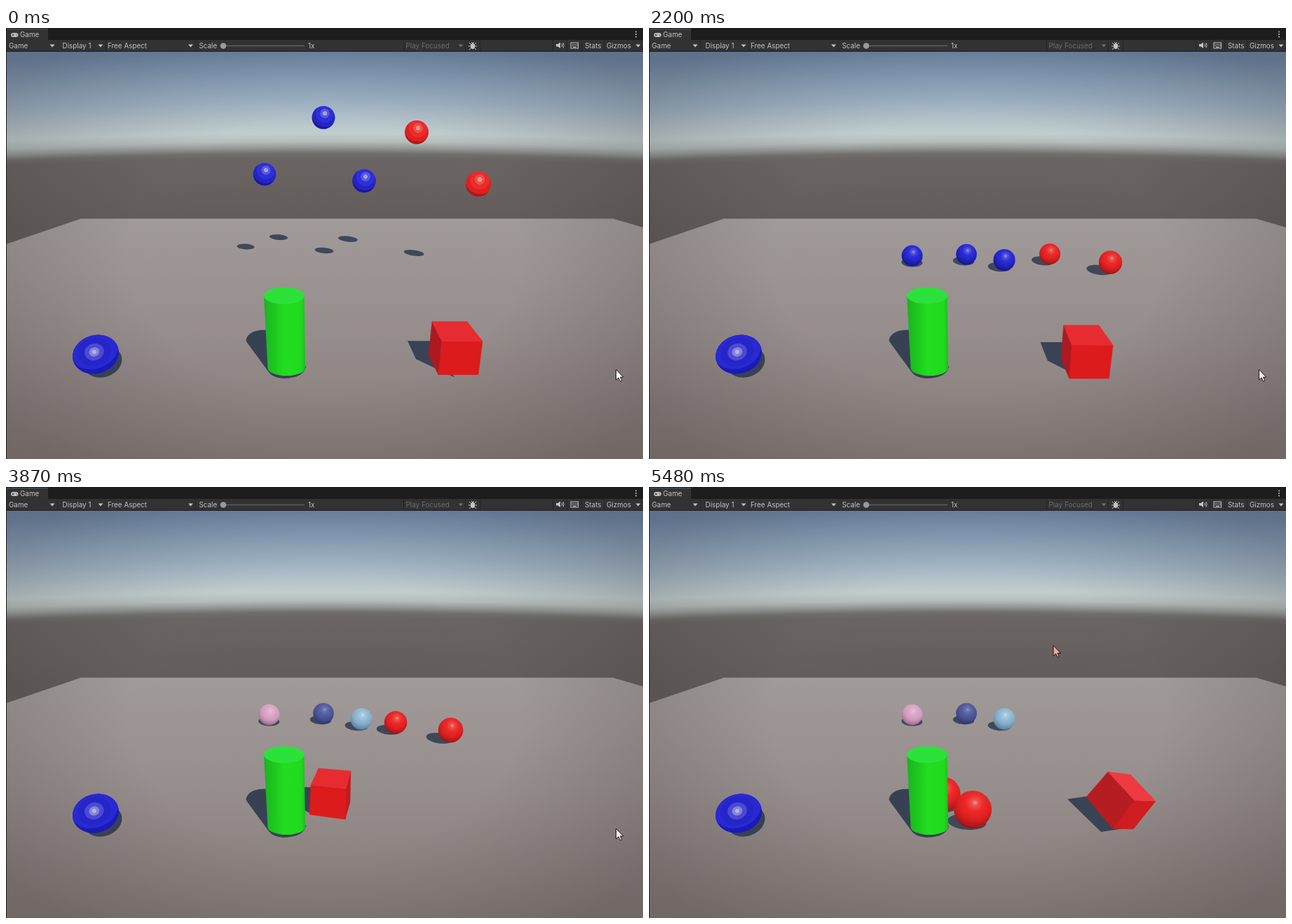
Recreate the animation shown at these times as an HTML page. Size 909 by 616 pixels, loop 5.55 s.

```html
<!DOCTYPE html>
<html lang="en">
<head>
<meta charset="utf-8">
<title>Game view</title>
<style>
  html, body { margin: 0; width: 100%; height: 100%; overflow: hidden; background: #1e1e1e; }
  svg { display: block; width: 909px; height: 616px; }
  text { font: 9.9px Inter, "Liberation Sans", sans-serif; fill: #c2c2c2; white-space: pre; }
</style>
</head>
<body>
<svg id="stage" viewBox="0 0 909 616" xmlns="http://www.w3.org/2000/svg">
  <defs id="defs">
    <linearGradient id="floor" x1="0" y1="0" x2="0" y2="1">
      <stop offset="0" stop-color="#a09a99"/><stop offset=".5" stop-color="#958d8b"/><stop offset="1" stop-color="#867c7a"/>
    </linearGradient>
    <radialGradient id="vignette" gradientUnits="userSpaceOnUse" cx="454" cy="325" r="560" gradientTransform="translate(0 97) scale(1 .7)">
      <stop offset=".5" stop-color="#1c1614" stop-opacity="0"/><stop offset="1" stop-color="#1c1614" stop-opacity=".2"/>
    </radialGradient>
    <linearGradient id="tube">
      <stop offset="0" stop-color="#1cae22"/><stop offset=".1" stop-color="#1bbc20"/><stop offset=".3" stop-color="#1dcc1e"/>
      <stop offset=".5" stop-color="#22de20"/><stop offset=".9" stop-color="#20d91e"/><stop offset="1" stop-color="#1cbc1e"/>
    </linearGradient>
  </defs>
  <rect y="33" width="909" height="583" fill="url(#sky)"/>
  <path d="M0 309L107 272.5H866L909 285V616H0z" fill="url(#floor)"/>
  <rect y="33" width="909" height="583" fill="url(#vignette)"/>
  <g id="shadows" fill="#3f4859"></g>
  <g id="balls"></g>
  <g id="cube"></g>
  <ellipse cx="138" cy="477" rx="28" ry="22" transform="rotate(-18 138 477)" fill="#384153"/>
  <g transform="translate(128 466.5) rotate(-17)">
    <ellipse rx="33.5" ry="27.5" fill="#1a1ab6"/>
    <path d="M-33.5 0A33.5 27.5 0 0 1 33.5 0Q24 20 -2 20Q-28 18 -33.5 0z" fill="#2929d4"/>
    <ellipse cx="-1" cy="-4" rx="24" ry="20" fill="#2525c8"/>
    <ellipse cx="-1" cy="-4" rx="14" ry="12" fill="#4a4ad6"/>
    <ellipse cx="-1" cy="-4" rx="7.5" ry="6.5" fill="#8585d8"/>
    <circle cx="-1" cy="-4" r="3" fill="#b4b4dc"/>
  </g>
  <path d="M342.5 446Q346 431 371 431.5L428 484Q425 500 396 501Q381 500 375 492L345 451Q342.500 448 342.500 446z" fill="#384153"/>
  <path d="M368 383L373.500 486A26.700 11 0 0 0 427 486L425.500 383z" fill="url(#tube)"/>
  <ellipse cx="396.800" cy="382.500" rx="29" ry="12" fill="#2ce23a"/>
  <path id="cursor" d="M0 0V15L3.500 11.800L6 17L8.300 16L6 11H10.500z" stroke="#181818" stroke-width="1"/>
  <g id="chrome">
    <rect width="909" height="17" fill="#1d1d1d"/>
    <rect x="1" y="1" width="59" height="16" fill="#333"/>
    <rect x="1" y="1" width="59" height="1" fill="#3b5872"/>
    <rect y="17" width="909" height="16.500" fill="#323232"/>
    <rect y="33" width="909" height="1" fill="#1f1f1f"/>
    <rect y="17" width="1" height="599" fill="#1f1f1f"/>
    <rect x="7" y="7" width="10.500" height="6" rx="3" fill="#c2c2c2"/>
    <path d="M8.500 10H11.500M10 8.500V11.500M14 9H15M15 11H16" stroke="#333"/>
    <path d="M310 25.500H426" stroke="#5e5e5e" stroke-width="1.500"/>
    <circle cx="310" cy="25.500" r="4.300" fill="#999"/>
    <g fill="#c4c4c4">
      <circle cx="899" cy="5.500" r="1"/><circle cx="899" cy="9" r="1"/><circle cx="899" cy="12.500" r="1"/>
      <path d="M785 23H787.500L791 20.500V29L787.500 26.500H785z"/>
      <ellipse cx="666" cy="26" rx="3" ry="4"/>
    </g>
    <path d="M661 21L664 24M671 21L668 24M660 26H672M661 31L664 28M671 31L668 28M664 20L666 22L668 20M793 22.500Q794.500 25 793 27M795 21Q797 25 795 28.500" fill="none" stroke="#c4c4c4"/>
    <rect x="806" y="21" width="10.500" height="8" fill="none" stroke="#c4c4c4"/>
    <path d="M807.500 23.500H816M807.500 25.500H816" stroke="#c4c4c4" stroke-dasharray="1.300 1"/>
    <path d="M809 27.500H814" stroke="#c4c4c4"/>
  </g>
</svg>
<script>
const $ = id => document.getElementById(id);
function add(parent, tag, attrs, text) {
  const el = document.createElementNS('http://www.w3.org/2000/svg', tag);
  set(el, attrs);
  if (text) el.textContent = text;
  return parent.appendChild(el);
}
function set(el, attrs) {
  for (const key in attrs) el.setAttribute(key, attrs[key]);
}
const clamp = v => Math.max(0, Math.min(1, v));
const mix = (a, b, p) => a + (b - a) * p;
const mixAll = (a, b, p) => a.map((v, i) => mix(v, b[i], p));

// Piecewise linear track: [[key, values], ...]
function track(keys, at) {
  let i = 0;
  while (i < keys.length - 2 && at > keys[i + 1][0]) i++;
  const [k0, a] = keys[i], [k1, b] = keys[i + 1];
  return mixAll(a, b, clamp((at - k0) / (k1 - k0)));
}

// Sky bands bend with the horizon, so they lie on one large circle.
const RADIUS = 9550;
const sky = add($('defs'), 'radialGradient', {
  id: 'sky', gradientUnits: 'userSpaceOnUse', cx: 454, cy: RADIUS, r: RADIUS, fr: RADIUS - 616
});
[[616, '#5c5754'], [272, '#625d5b'], [220, '#676260'], [186, '#6a6564'], [179, '#716e6e'], [171, '#949896'],
 [162, '#b4bebc'], [150, '#c1cecd'], [132, '#b4c3ca'], [105, '#9fb2c3'], [75, '#8ba2ba'], [34, '#7088a8']]
  .forEach(([y, color]) => add(sky, 'stop', { offset: (616 - y) / 616, 'stop-color': color }));

function ballGradient(id, colors, hard) {
  const g = add($('defs'), 'radialGradient', { id, cx: .56, cy: .32, r: .72 });
  const edges = hard ? [0, .13, .28, .55, .8, 1] : [0, .12, .32, .6, .85, 1];
  colors.forEach((color, i) => {
    add(g, 'stop', { offset: edges[i], 'stop-color': color });
    if (hard && i < 5) add(g, 'stop', { offset: edges[i + 1], 'stop-color': color });
  });
}
const SHADES = {
  blue: ['#a0a0dc', '#5858dc', '#2e2eda', '#2424c4', '#1818a0', '#121270'],
  red: ['#e69a90', '#ec5048', '#ee2a2a', '#de2020', '#b41818', '#801414'],
  pink: ['#e8c4d8', '#e2b4d0', '#dca6c8', '#d09abc', '#a87898', '#806078'],
  slate: ['#9aa0c8', '#6c74b0', '#5660a2', '#4a5494', '#384078', '#2a305c'],
  pale: ['#cfe0e8', '#a8cadc', '#94bcd6', '#84acc6', '#648ca8', '#486c84']
};
for (const name in SHADES) ballGradient(name, SHADES[name]);
ballGradient('blueHard', SHADES.blue, true);
ballGradient('redHard', SHADES.red, true);

const HIT = 36.4; // step at which the cube touches the cylinder
const BALLS = [
  { from: [453, 128, 16.5], to: [453, 323.5, 14.8], shade: [389, 299], color: 'blue', later: 'slate' },
  { from: [369, 209, 16.3], to: [375.5, 325.5, 15], shade: [342, 312.5], color: 'blue', later: 'pink' },
  { from: [511, 218.5, 16.8], to: [507, 331.5, 15.6], shade: [454, 318], color: 'blue', later: 'pale' },
  { from: [586, 149, 17], to: [572, 323, 15], shade: [488, 301.5], color: 'red',
    roll: [[556, 336.5, 16.3], [511.5, 374.5, 19.3], [420, 439, 24.5]] },
  { from: [674, 223, 18], to: [658.5, 335, 16.7], shade: [582, 321.5], color: 'red',
    roll: [[634.5, 347.5, 17.8], [570.5, 380, 20], [462, 461, 27]] }
];
for (const ball of BALLS) {
  ball.shadow = add($('shadows'), 'ellipse', {});
  ball.body = add($('balls'), 'circle', {});
}

function drawBall(ball, step) {
  const { from, to, roll } = ball;
  const drop = clamp(.7 * step * step / (to[1] - from[1]));
  let pos = mixAll(from, to, drop);
  if (roll && step > HIT) {
    pos = track([[0, to], [135, roll[0]], [511, roll[1]], [1197, roll[2]]], (step - HIT) ** 2);
  }
  const [x, y, r] = pos;
  const base = drop < 1 ? to : pos;
  const lean = (base[0] - 370) / 300;
  const [sx, sy] = mixAll(ball.shade, [base[0] - lean * base[2], base[1] + .65 * base[2]], drop);
  set(ball.shadow, {
    cx: sx, cy: sy, rx: mix(12.5 + Math.max(0, lean) * 2, base[2] * (1 + .1 * Math.abs(lean)), drop),
    ry: mix(4, base[2] * .42, drop), transform: `rotate(${3 + lean * 5} ${sx} ${sy})`
  });
  const name = step > HIT && ball.later || ball.color;
  set(ball.body, { cx: x, cy: y, r, fill: `url(#${name}${step ? '' : 'Hard'})` });
}

// Top back left/right, top front right/left, bottom front right/left, then four shadow corners.
const POSES = [
  [22.7, [608,425, 658,425, 680,453, 622,453, 674,501, 617,501, 573,449, 610,449, 640,501, 585,475]],
  [30, [516,424, 568,424, 580,454, 517,453, 575,501, 520,501, 491,449, 520,449, 525,501, 494,478]],
  [36, [438,424, 488,424, 491,454, 431,454, 487,501, 434,501, 413,449, 440,449, 440,501, 416,478]],
  [48, [446,402, 492,406, 485,431, 435,426, 484,475, 433,468, 412,429, 440,429, 440,469, 416,457]],
  [59, [480,388, 520,415, 511,440, 467,408, 484,475, 441,446, 433,457, 447,436, 484,474, 476,474]],
  [71, [687,411, 723,449, 693,448, 655,407, 661,488, 624,443, 597,446, 640,440, 691,486, 645,493]]
];
const cubeShadow = add($('shadows'), 'polygon', { fill: '#3a4355' });
const faces = Array.from({ length: 4 }, () => add($('cube'), 'polygon', { 'stroke-width': .5 }));

function drawCube(step) {
  const v = track(POSES, step);
  const lift = 5.5 * (1 - clamp(step * step / 8));
  const pts = Array.from({ length: 10 }, (_, i) => [v[2 * i], v[2 * i + 1] - (i > 5 ? lift / 3 : lift)]);
  const [tbl, tbr, tfr, tfl, bfr, bfl, ...shade] = pts;
  const below = (a, b, c) => [a[0] + b[0] - c[0], a[1] + b[1] - c[1]];
  const bbl = below(tbl, bfl, tfl), bbr = below(tbr, bfr, tfr);
  const turn = clamp((step - 59) / 12);
  const front = `rgb(${mix(220, 182, turn)},${mix(27, 29, turn)},${mix(28, 33, turn)})`;
  const top = `rgb(${mix(231, 239, turn)},${mix(44, 58, turn)},${mix(49, 66, turn)})`;
  const sides = [
    [[tbl, tfl, bfl, bbl], '#ac1a20'],
    [[tfr, tbr, bbr, bfr], `rgb(${mix(192, 207, turn)},28,32)`],
    [[tfl, tfr, bfr, bfl], front],
    [[tbl, tbr, tfr, tfl], top]
  ];
  sides.forEach(([corners, fill], i) => {
    const area = corners.reduce((sum, p, j) => {
      const q = corners[(j + 1) % 4];
      return sum + p[0] * q[1] - q[0] * p[1];
    }, 0);
    set(faces[i], { points: corners.join(' '), fill, stroke: fill, visibility: area > 0 ? 'visible' : 'hidden' });
  });
  cubeShadow.setAttribute('points', shade.join(' '));
}

function drawCursor(step) {
  const p = clamp((step - 64) / 7), ease = p * p * (3 - 2 * p);
  const fill = step > 64 ? '#f7a3a0' : step ? '#fbe4e4' : '#fff';
  set($('cursor'), { transform: `translate(${mix(870.5, 577, ease)} ${mix(488, 226.5, ease)})`, fill });
}

[['Game', 20, 13], ['Game', 4], ['Display 1', 80.5], ['Free Aspect', 145], ['Scale', 275.5], ['1x', 431],
 ['Play Focused', 570.5, 28.500, '#6c6c6c'], ['Stats', 826], ['Gizmos', 857]]
  .forEach(([label, x, y = 28.5, fill = '#c2c2c2']) => add($('chrome'), 'text', { x, y, style: `fill:${fill}` }, label));
[66, 135, 263.5, 649, 902].forEach(x =>
  add($('chrome'), 'path', { d: `M${x - 3.5} 23.500h7l-3.500 4z`, fill: x === 649 ? '#6c6c6c' : '#c2c2c2' }));
[73.5, 142.5, 270.5, 567.5, 655.5, 676.5, 780.5, 800.5, 821.5, 853.5].forEach(x =>
  add($('chrome'), 'path', { d: `M${x} 17V33`, stroke: '#262626' }));

const LOOP = 5550, HOLD = 600, STEP = 4880 / 70;
function render(time) {
  const t = time % LOOP;
  const step = t < HOLD ? 0 : Math.min(71, Math.floor((t - HOLD) / STEP + .25) + 1);
  for (const ball of BALLS) drawBall(ball, step);
  drawCube(step);
  drawCursor(step);
}
const start = performance.now();
function tick() {
  render(performance.now() - start);
  requestAnimationFrame(tick);
}
tick();
</script>
</body>
</html>
```
